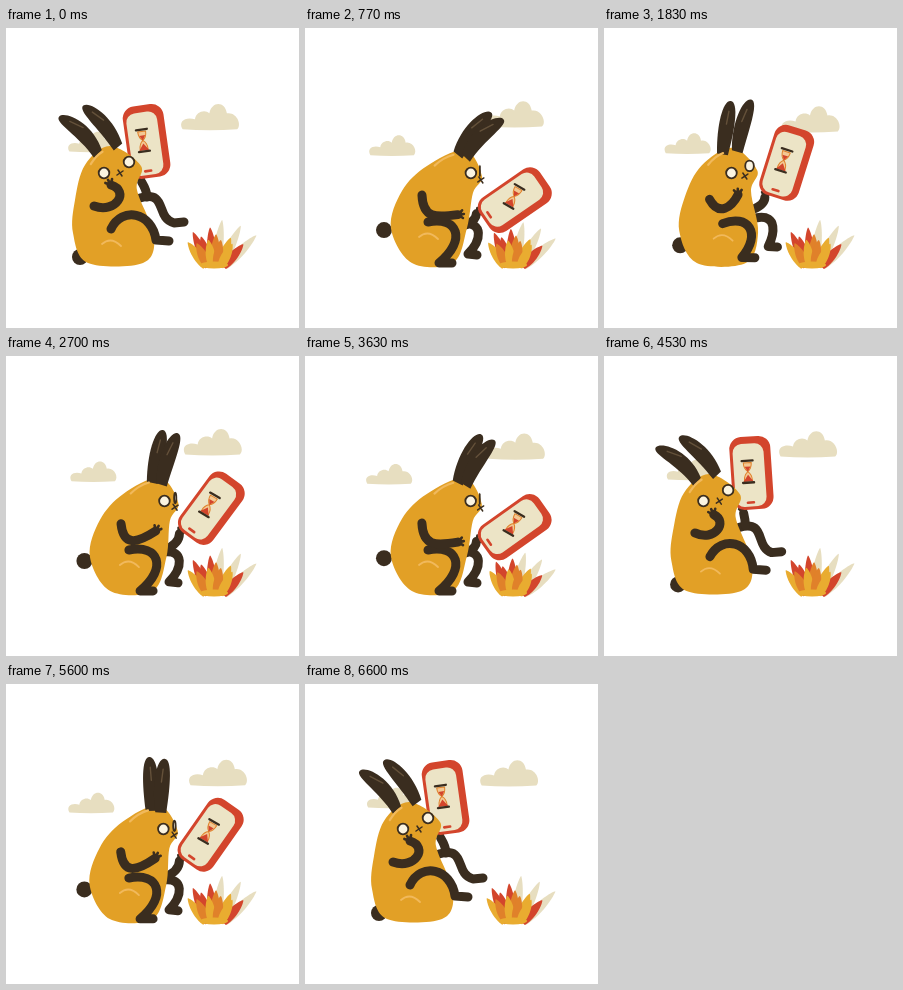
These frames come from a looping animation (293 by 300 pixels, 6630 ms). An HTML page:

```html
<!DOCTYPE html>
<html lang="en">
<head>
<meta charset="utf-8">
<title>Rabbit shaking a phone</title>
<style>
html, body { margin: 0; width: 100%; height: 100%; overflow: hidden; background: #fff; }
svg { display: block; width: 100vw; height: 100vh; }
path { stroke-linecap: round; stroke-linejoin: round; }
</style>
</head>
<body>
<svg id="stage" viewBox="0 0 293 300"></svg>
<script>
const PERIOD = 2210;
const DARK = '#3a2d1f', BODY = '#e2a026', LIGHT = '#f1b95c', RED = '#d3452c',
      ORANGE = '#e0812a', YELLOW = '#e9ac30', CREAM = '#ece4c6', PALE = '#e7dec0';
const stage = document.getElementById('stage');

function add(tag, attrs, parent = stage) {
  const el = document.createElementNS('http://www.w3.org/2000/svg', tag);
  set(el, attrs);
  parent.append(el);
  return el;
}
function set(el, attrs) {
  for (const key in attrs) el.setAttribute(key, attrs[key]);
}
const shape = (fill, parent) => add('path', { fill }, parent);
const line = (stroke, width, parent) =>
  add('path', { fill: 'none', stroke, 'stroke-width': width }, parent);
const place = (el, x, y, more = '') =>
  set(el, { transform: `translate(${x} ${y}) ${more}` });

const lerp = (a, b, k) => a + (b - a) * k;
const mix = (a, b, k) => a.map((v, i) => lerp(v, b[i], k));
const bump = (time, centre, width) => Math.exp(-(((time - centre) / width) ** 2));
const polar = ([x, y], degrees, length) => {
  const a = degrees * Math.PI / 180;
  return [x + Math.sin(a) * length, y - Math.cos(a) * length];
};

// Periodic sine easing through [time, value] turning points.
function ease(keys, time) {
  if (time < keys[0][0]) time += PERIOD;
  const next = Math.max(1, keys.findIndex(([t]) => t >= time));
  const [t0, a] = keys[next - 1], [t1, b] = keys[next];
  return lerp(a, b, 0.5 - 0.5 * Math.cos(Math.PI * (time - t0) / (t1 - t0)));
}

// How far the rabbit leans forward, and the trailing ear angle
const LEAN = [[60, 0], [610, 1], [740, 1], [1150, 0.87], [1460, 1], [1500, 1], [2110, 0], [60 + PERIOD, 0]];
const EARS = [[110, -47], [720, 42], [770, 41], [1180, 1], [1540, 38], [110 + PERIOD, -47]];

// Every part moves between a leaning-back and a crouching pose.
const PARTS = {
  body: [[82,235, 67,205, 69,172, 79,137, 104,118, 135,138, 131,162, 148,208, 137,235],
         [107,235, 86,200, 97,163, 122,138, 160,122, 177,148, 168,165, 162,200, 148,235]],
  // start, two controls, end, toe
  nearLeg: [[105,201, 116,178, 146,184, 150,212, 163,213],
            [123,194, 153,188, 162,212, 134,235, 147,235]],
  farLeg: [[134,170, 162,162, 149,190, 168,195, 178,194],
           [159,196, 178,194, 177,212, 163,226, 172,227]],
  nearArm: [[88,178, 110,186, 124,163, 105,157],
            [117,167, 118,190, 130,190, 153,187]],
  shoulder: [[141,169], [161,197]],
  eyes: [[98,145, 123,134], [166,145, 175,143]],
  mouth: [[114,145], [176,152]],
  earBases: [[92,126, 112,119], [153,127, 161,130]],
  tail: [[74,229], [79,202]]
};
const pose = (part, k) => mix(...PARTS[part], k);

function blob(flat) {
  const n = flat.length;
  const at = i => flat.slice((i + n) % n, (i + n) % n + 2);
  let d = 'M' + at(0);
  for (let i = 0; i < n; i += 2) {
    const [a, b, c, e] = [-2, 0, 2, 4].map(step => at(i + step));
    d += `C${b.map((v, j) => v + (c[j] - a[j]) / 6)} ${c.map((v, j) => v - (e[j] - b[j]) / 6)} ${c}`;
  }
  return d + 'Z';
}

function leaf(base, mid, tip, [w0, w1, w2]) {
  const length = Math.hypot(tip[0] - base[0], tip[1] - base[1]);
  const normal = [(base[1] - tip[1]) / length, (tip[0] - base[0]) / length];
  const off = (p, w) => p.map((v, i) => v + normal[i] * w);
  return `M${off(base, -w0)}C${off(mid, -w1)} ${off(tip, -w2)} ${tip}` +
         `C${off(tip, w2)} ${off(mid, w1)} ${off(base, w0)}Z`;
}

const limbPath = ([x, y, ...rest]) =>
  `M${x} ${y}C${rest.slice(0, 6)}` + (rest.length > 6 ? `L${rest.slice(6)}` : '');

function fingers(tip, degrees) {
  return [-45, -5, 35].map(spread => `M${tip}L${polar(tip, degrees + spread, 6)}`).join('');
}

// Scene, back to front
const CLOUD = 'M2 0C-3 -9 6 -13 14 -10C15 -18 24 -20 28 -16C30 -28 43 -29 45 -16C54 -18 60 -5 55 0Q28 2 2 0Z';
const clouds = [0, 1].map(() => add('path', { d: CLOUD, fill: PALE }));
const tail = add('circle', { r: 8, fill: DARK });

const PETAL_ROWS = [
  { colors: [PALE], count: 3, from: 9, to: 53, length: 48, bend: 5 },
  { colors: [RED], count: 2, from: -28, to: -5, length: 40, bend: 4 },
  { colors: [YELLOW, RED, ORANGE], count: 5, from: -42, to: 48, length: 33, bend: 3 },
  { colors: [ORANGE, YELLOW], count: 4, from: -30, to: 32, length: 28, bend: 2 }
];
const petals = PETAL_ROWS.flatMap(({ colors, count, from, to, length, bend }) =>
  Array.from({ length: count }, (_, i) => ({
    angle: lerp(from, to, i / (count - 1)), length, bend, el: shape(colors[i % colors.length])
  })));
add('ellipse', { cx: 208, cy: 237, rx: 14, ry: 3.5, fill: YELLOW });

const limb = () => line(DARK, 9);
const hand = () => line(DARK, 2.6);
const farLeg = limb(), farArm = limb(), farHand = hand();

const phone = add('g', {});
add('rect', { x: -20, y: -36, width: 41, height: 73, rx: 12, fill: RED }, phone);
add('rect', { x: -17, y: -29, width: 31, height: 63, rx: 9, fill: CREAM }, phone);
add('path', { d: 'M-5 30H1', stroke: RED, 'stroke-width': 2.6 }, phone);
const glass = add('g', {}, phone);
add('path', { d: 'M-4 -9Q-4 -3 0 0Q-4 3 -4 9H4Q4 3 0 0Q4 -3 4 -9Z', fill: '#f3c893', stroke: ORANGE }, glass);
add('path', { d: 'M-3 -5H3L0 0ZM-5 10L0 3L5 10Z', fill: RED }, glass);
add('path', { d: 'M-5.5 -11H5.5M-5.5 11H5.5', stroke: DARK, 'stroke-width': 2.3 }, glass);

const body = shape(BODY);
const ears = [0, 1].map(() => ({ el: shape(DARK), shine: line('#64513a', 1.4) }));
const backShine = line(LIGHT, 2.2), hipShine = line(LIGHT, 1.8);
const eyes = [0, 1].map(() =>
  add('ellipse', { rx: 5.3, ry: 5.3, fill: '#fbf4e0', stroke: DARK, 'stroke-width': 1.8 }));
const mouth = add('path', { d: 'M-2 -3L0 0L3 -2M0 0L-3 2M0 0L2 3', fill: 'none', stroke: DARK, 'stroke-width': 1.5 });
const nearLeg = limb(), nearArm = limb(), nearHand = hand();

function drawScenery(time) {
  const turn = 2 * Math.PI * (time - 50) / PERIOD;
  const s = Math.sin(turn), c = Math.cos(turn);
  place(clouds[0], 178.5 - 4 * c, 101 - 2.7 * s, 'scale(1.03 1)');
  place(clouds[1], 62 + 2 * s, 126 - 2.5 * c, 'scale(.82 .78)');

  const push = bump(time, 685, 90) + bump(time, 1470, 100);
  for (const { angle, length, bend, el } of petals) {
    const base = [208 + angle * 0.2, 239];
    const reach = length - Math.abs(angle) * 0.06 - push * bend;
    const tip = polar(base, angle * 0.85 + push * bend * 1.6, reach);
    set(el, { d: leaf(base, mix(base, tip, 0.5), tip, [3, 8, 1]) });
  }
}

function drawPhone(lean, reach, dip) {
  const x = 140 + 70 * reach, y = 113 + 35 * reach + 24 * dip;
  const angle = -8 + 42 * reach + 22 * dip;
  place(phone, x, y, `rotate(${angle})`);
  place(glass, -3, -1, `rotate(${-26 * dip})`);

  // The far hand holds the lower left corner.
  const grip = polar(polar([x, y], angle + 180, 40), angle - 90, 10);
  const shoulder = pose('shoulder', lean);
  const elbow = [Math.max(shoulder[0], grip[0]), lerp(shoulder[1], grip[1], 0.4)];
  set(farArm, { d: `M${shoulder}Q${elbow} ${grip}` });
  set(farHand, { d: fingers(grip, angle) });
}

function drawEars(lean, angle) {
  const bases = pose('earBases', lean);
  ears.forEach(({ el, shine }, i) => {
    const base = bases.slice(i * 2, i * 2 + 2);
    const mid = polar(base, angle * 0.6, 28);
    const tip = polar(base, angle + (i ? 3 : -3), 54);
    set(el, { d: leaf(base, mid, tip, [5.5, 9.5, 8]) });
    set(shine, { d: `M${mix(mid, tip, 0.1)}L${mix(mid, tip, 0.6)}` });
  });
}

function draw(time) {
  const lean = ease(LEAN, time);
  const reach = lean ** 0.6;
  const dip = lean ** 12;
  const step = 1 - (1 - lean) ** 2.5;

  drawScenery(time);
  drawPhone(lean, reach, dip);
  drawEars(lean, ease(EARS, time));

  const outline = pose('body', lean);
  set(body, { d: blob(outline) });
  const back = outline.slice(6, 8), head = outline.slice(8, 10);
  const [qx, qy] = mix(back, head, 0.4);
  set(backShine, { d: `M${mix(back, head, 0.15).map(v => v + 2)}Q${qx + 1} ${qy - 2} ${mix(back, head, 0.7)}` });

  const [tx, ty] = pose('tail', lean);
  set(tail, { cx: tx, cy: ty });
  const [x1, y1, x2, y2] = pose('eyes', lean);
  set(eyes[0], { cx: x1, cy: y1 });
  set(eyes[1], { cx: x2, cy: y2, rx: 5.3 * (1 - lean ** 2) });
  place(mouth, ...pose('mouth', lean));

  const leg = pose('nearLeg', step);
  set(nearLeg, { d: limbPath(leg) });
  set(farLeg, { d: limbPath(pose('farLeg', step)) });
  set(hipShine, { d: `M${leg[0] - 9} ${leg[1] + 15}q9 -8 19 2` });

  const arm = pose('nearArm', reach);
  arm[7] -= 14 * reach * (1 - dip);
  set(nearArm, { d: limbPath(arm) });
  set(nearHand, { d: fingers(arm.slice(6), lerp(-25, 20, reach) + 70 * dip) });
}

const start = performance.now();
function frame() {
  draw((performance.now() - start) % PERIOD);
  requestAnimationFrame(frame);
}
frame();
</script>
</body>
</html>
```
